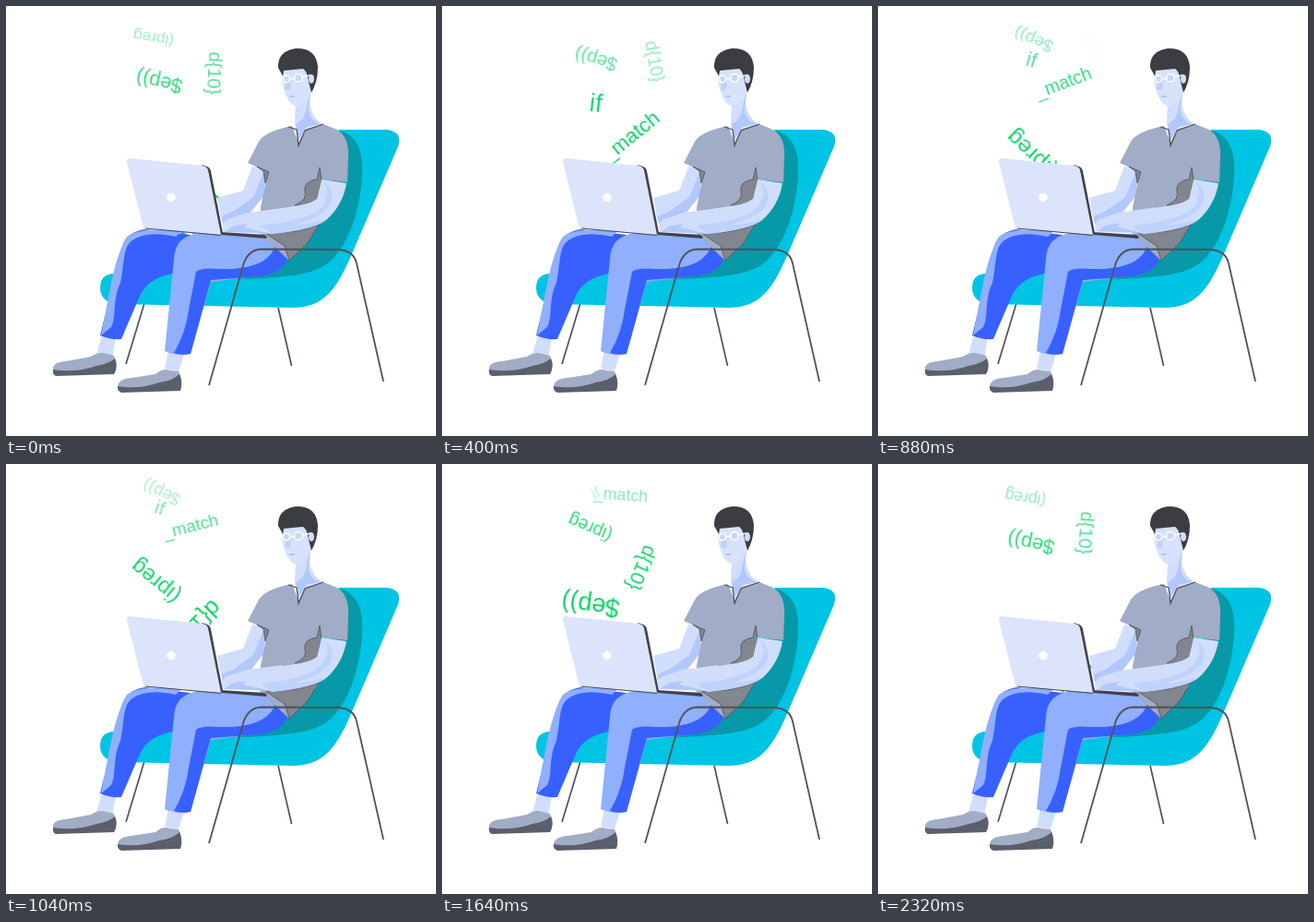
An HTML page without scripts that plays this animation: 466x466 px, repeating every 2.36 s.

```html
<!DOCTYPE html>
<html lang="en">
<head>
<meta charset="utf-8">
<title>Coding in a chair</title>
<style>
  html, body { margin: 0; width: 100%; height: 100%; overflow: hidden; background: #fff; }
  svg { display: block; width: 100vw; height: 100vh; }

  .words text {
    font: 20px "Liberation Sans", Arial, sans-serif;
    fill: #08d264;
    text-anchor: middle;
    animation: 2360ms linear infinite;
  }
  .words .match { animation-name: match; }
  .words .if { animation-name: if; }
  .words .preg { animation-name: preg; }
  .words .digits { animation-name: digits; }
  .words .step { animation-name: step; }
  .hand { animation: type 2360ms linear infinite; }

  @keyframes match {
    0% { transform: translate(205px, 236px) rotate(-50deg) scale(1.22); opacity: 1; }
    8.5% { transform: translate(205px, 183px) rotate(-44deg) scale(1.18); }
    16.95% { transform: translate(205px, 142px) rotate(-39deg) scale(1.12); opacity: 1; }
    28.8% { transform: translate(203px, 105px) rotate(-29deg) scale(1.01); opacity: .95; }
    44.1% { transform: translate(200px, 68px) rotate(-14deg) scale(.94); opacity: .75; }
    69.5% { transform: translate(194px, 34px) rotate(4deg) scale(.89); opacity: .5; }
    84.75% { transform: translate(193px, 28px) rotate(15deg) scale(.86); opacity: .3; }
    95% { transform: translate(192px, 22px) rotate(20deg) scale(.84); opacity: 0; }
    95.1% { transform: translate(205px, 270px) rotate(-54deg) scale(1.24); opacity: 0; }
    95.2% { opacity: 1; }
    100% { transform: translate(205px, 236px) rotate(-50deg) scale(1.22); opacity: 1; }
  }
  @keyframes if {
    0% { transform: translate(168px, 192px) scale(1.5); opacity: 1; }
    8.5% { transform: translate(167px, 143px) rotate(2deg) scale(1.45); }
    16.95% { transform: translate(167px, 105px) rotate(6deg) scale(1.36); opacity: .95; }
    28.8% { transform: translate(166px, 72px) rotate(12deg) scale(1.18); opacity: .85; }
    44.1% { transform: translate(167px, 47px) rotate(20deg) scale(1.04); opacity: .55; }
    69.5% { transform: translate(167px, 32px) rotate(-28deg) scale(.92); opacity: .25; }
    77% { transform: translate(167px, 28px) rotate(-34deg) scale(.9); opacity: 0; }
    77.1%, 95% { transform: translate(168px, 205px) scale(1.5); opacity: 0; }
    100% { transform: translate(168px, 192px) scale(1.5); opacity: 1; }
  }
  @keyframes preg {
    0% { transform: translate(160px, 34px) rotate(189deg) scale(.87); opacity: .4; }
    13% { transform: translate(160px, 26px) rotate(184deg) scale(.84); opacity: 0; }
    13.1%, 28% { transform: translate(172px, 205px) rotate(228deg) scale(1.3); opacity: 0; }
    28.1% { opacity: 1; }
    44.1% { transform: translate(163px, 126px) rotate(219deg) scale(1.2); opacity: .95; }
    55% { transform: translate(162px, 93px) rotate(211deg) scale(1.07); }
    69.5% { transform: translate(161px, 68px) rotate(203deg) scale(.97); opacity: .85; }
    84.75% { transform: translate(160px, 48px) rotate(193deg) scale(.92); opacity: .65; }
    100% { transform: translate(160px, 34px) rotate(189deg) scale(.87); opacity: .4; }
  }
  @keyframes digits {
    0% { transform: translate(226px, 73px) rotate(93deg) scale(1); opacity: .7; }
    16.95% { transform: translate(230px, 60px) rotate(80deg) scale(.97); opacity: .45; }
    28.8% { transform: translate(233px, 53px) rotate(68deg) scale(.94); opacity: .3; }
    38% { transform: translate(235px, 48px) rotate(60deg) scale(.92); opacity: 0; }
    38.1% { transform: translate(196px, 202px) rotate(140deg) scale(1.28); opacity: 0; }
    38.2% { opacity: 1; }
    44.1% { transform: translate(208px, 172px) rotate(135deg) scale(1.25); opacity: 1; }
    55% { transform: translate(213px, 138px) rotate(123deg) scale(1.17); }
    69.5% { transform: translate(217px, 113px) rotate(113deg) scale(1.09); opacity: .95; }
    84.75% { transform: translate(221px, 90px) rotate(103deg) scale(1.03); opacity: .85; }
    100% { transform: translate(226px, 73px) rotate(93deg) scale(1); opacity: .7; }
  }
  @keyframes step {
    0% { transform: translate(166px, 82px) rotate(192deg) scale(1.09); opacity: .85; }
    16.95% { transform: translate(167px, 57px) rotate(196deg) scale(1.01); opacity: .65; }
    28.8% { transform: translate(168px, 44px) rotate(199deg) scale(.96); opacity: .55; }
    44.1% { transform: translate(169px, 30px) rotate(205deg) scale(.92); opacity: .35; }
    56% { transform: translate(169px, 21px) rotate(209deg) scale(.9); opacity: 0; }
    56.1% { transform: translate(168px, 205px) rotate(181deg) scale(1.3); opacity: 0; }
    56.2% { opacity: 1; }
    69.5% { transform: translate(161px, 152px) rotate(187deg) scale(1.35); opacity: 1; }
    84.75% { transform: translate(164px, 112px) rotate(189deg) scale(1.2); opacity: .95; }
    100% { transform: translate(166px, 82px) rotate(192deg) scale(1.09); opacity: .85; }
  }
  @keyframes type {
    0%, 17%, 100% { transform: none; }
    29%, 85% { transform: translate(2px, 0); }
    44%, 70% { transform: translate(-1px, -1px); }
  }
</style>
</head>
<body>
<svg viewBox="0 0 466 466">
  <g class="words">
    <text class="match" dy=".3em">_match</text>
    <text class="if" dy=".35em">if</text>
    <text class="preg" dy=".28em">(ipreg</text>
    <text class="digits" dy=".34em">d{10}</text>
    <text class="step" dy=".3em">$ep))</text>
  </g>

  <!-- chair -->
  <g fill="none" stroke="#505359" stroke-width="1.7">
    <path d="M150 322 130 388M295 327 309.500 390"/>
  </g>
  <path fill="#00c4e4" d="M361 134H413Q430 136 425 152L373 273C357 309 343 327 310 327L122 323Q103 322 102 306 102 291 116 290L270 270Z"/>
  <path fill="#0799a8" d="M361 135C379 139 388 156 386 184 383 225 371 257 353 275 337 291 311 293 262 296L215 294 290 250 350 200Z"/>

  <!-- far leg -->
  <path fill="#d0defc" d="M104 356 119 360 115 383 97 381Z"/>
  <path fill="#a1acc6" d="M51 393Q51 386 65 385L92 380Q101 374 109 377L117 379Q121 387 118 398L52 400Z"/>
  <path fill="#5b5f6c" d="M51 394Q75 398 98 390 111 388 118 382 122 390 117 399L54 401Q50 399 51 394Z"/>
  <path fill="#3860ff" d="M150 242Q132 245 127 258L116 300 102 357Q113 362 125 361L146 312Q156 294 181 290L200 248Z"/>
  <path fill="#90affc" d="M184 250Q152 243 137 254C126 262 129 277 124 300 115 318 120 338 114 348L103 357 112 310Q120 268 131 250 145 239 190 244Z"/>

  <!-- near leg -->
  <path fill="#d0defc" d="M176 373 193 377 187 396 172 393Z"/>
  <path fill="#a1acc6" d="M121 412Q122 404 136 403L162 399Q170 392 178 395L187 396Q191 403 189 414L124 418Z"/>
  <path fill="#5b5f6c" d="M121 412Q144 416 166 408 181 406 188 399 192 408 189 417L125 419Q120 417 121 412Z"/>
  <path fill="#90affc" d="M296 248 210 246Q183 249 182 274L172 374Q186 380 200 377L222 299 285 291 306 270Z"/>
  <path fill="#3860ff" d="M292 250Q306 256 306 271 302 289 276 293L222 297 212 333 200 377Q189 379 182 376 195 354 198 329L206 288Q211 283 232 285 268 286 283 273 294 264 292 250Z"/>

  <!-- far arm -->
  <path fill="#d0defc" d="M267 174 257 200 229 208 234 236 263 224 286 190 283 177Z"/>
  <path fill="#b3c8fa" d="M280 178 268 207 247 222 234 228 235 236 264 225 280 205Z"/>

  <!-- neck and head -->
  <path fill="#d0defc" d="M314 104 313 128 317 146 325 132 343 128Q332 122 329 106L331 84Z"/>
  <path fill="#b3c8fa" d="M330 93 328 112Q328 123 341 128L326 131 317 145 314 128Q325 123 326 109Z"/>
  <path fill="#d7e3fd" d="M300 62Q297 83 303 96 307 107 315 109 327 105 332 89L334 66Z"/>
  <path fill="#b3c8fa" d="M305 75 302 90 308 91 309 77Z" opacity=".7"/>
  <path fill="none" stroke="#8fa9e8" d="M307 98H313"/>
  <path fill="#3b3d42" d="M295 67Q294 49 314 46 336 45 338 66 338 82 331 94L328 82Q326 70 322 68L301 70 300 76Z"/>
  <g fill="#c7d7fb" stroke="#fff" stroke-width="1.600">
    <circle cx="304" cy="79" r="3.700"/>
    <circle cx="317" cy="78" r="4.300"/>
    <path fill="none" d="M307.700 78.500H312.700M321.300 77 330 75"/>
  </g>
  <ellipse cx="331" cy="79" rx="3" ry="5" fill="#d0defc"/>

  <!-- shirt -->
  <path fill="#a1acc6" d="M310 130 317 148 325 133 344 128 359 134Q372 142 371 164L370 191 343 188 338 240 307 276 275 246 276 218 284 180 262 170 274 147Q280 136 310 130Z"/>
  <g fill="#81868f" stroke="#4d5159" stroke-width=".8">
    <path d="M340 175 337 188Q322 190 324 201 327 210 313 216 330 219 337 211L342 189Z"/>
    <path d="M281 246Q315 247 339 237L327 257 307 276 302 260Z"/>
    <path d="M272 174 285 180 281 192 279 179Z"/>
  </g>
  <path fill="none" stroke="#4d5159" stroke-width="1.300" d="M306 131 315 134 317 151 324 135 344 128"/>

  <!-- near arm -->
  <g class="hand">
    <path fill="#d0defc" d="M300 219 262 224 240 231Q232 236 236 245L248 243 288 247 300 242Z"/>
    <path fill="#b3c8fa" d="M237 245 247 238 262 236 258 240 289 247Z"/>
  </g>
  <path fill="#d0defc" d="M342 188 369 192Q365 216 347 232 335 242 288 247L270 240 268 224 312 217Q329 215 337 209Z"/>
  <path fill="#b3c8fa" d="M343 189Q354 202 342 218 326 233 276 238L288 247Q334 243 348 231 329 237 313 237 340 231 351 216 359 202 343 189Z" opacity=".55"/>

  <!-- laptop -->
  <path fill="#40434c" d="M150 240 233 245 280 248Q284 250 282 252L234 248Z"/>
  <path fill="#40434c" d="M212 172 218 174Q221 175 222 179L235 246 232 248Z"/>
  <path fill="#dce4fb" d="M134 165 213 173Q218 174 219 178L233 248 152 241Q149 240 148 237L131 169Q131 165 134 165Z"/>
  <path fill="none" stroke="#40434c" d="M151 241 233 248.500"/>
  <circle cx="179" cy="207.500" r="4.700" fill="#fff"/>

  <!-- front chair frame -->
  <path fill="none" stroke="#505359" stroke-width="1.800" d="M220 411 257 281Q262 264 277 263.500L360 264Q377 265 380 279L409 407"/>
</svg>
</body>
</html>
```
